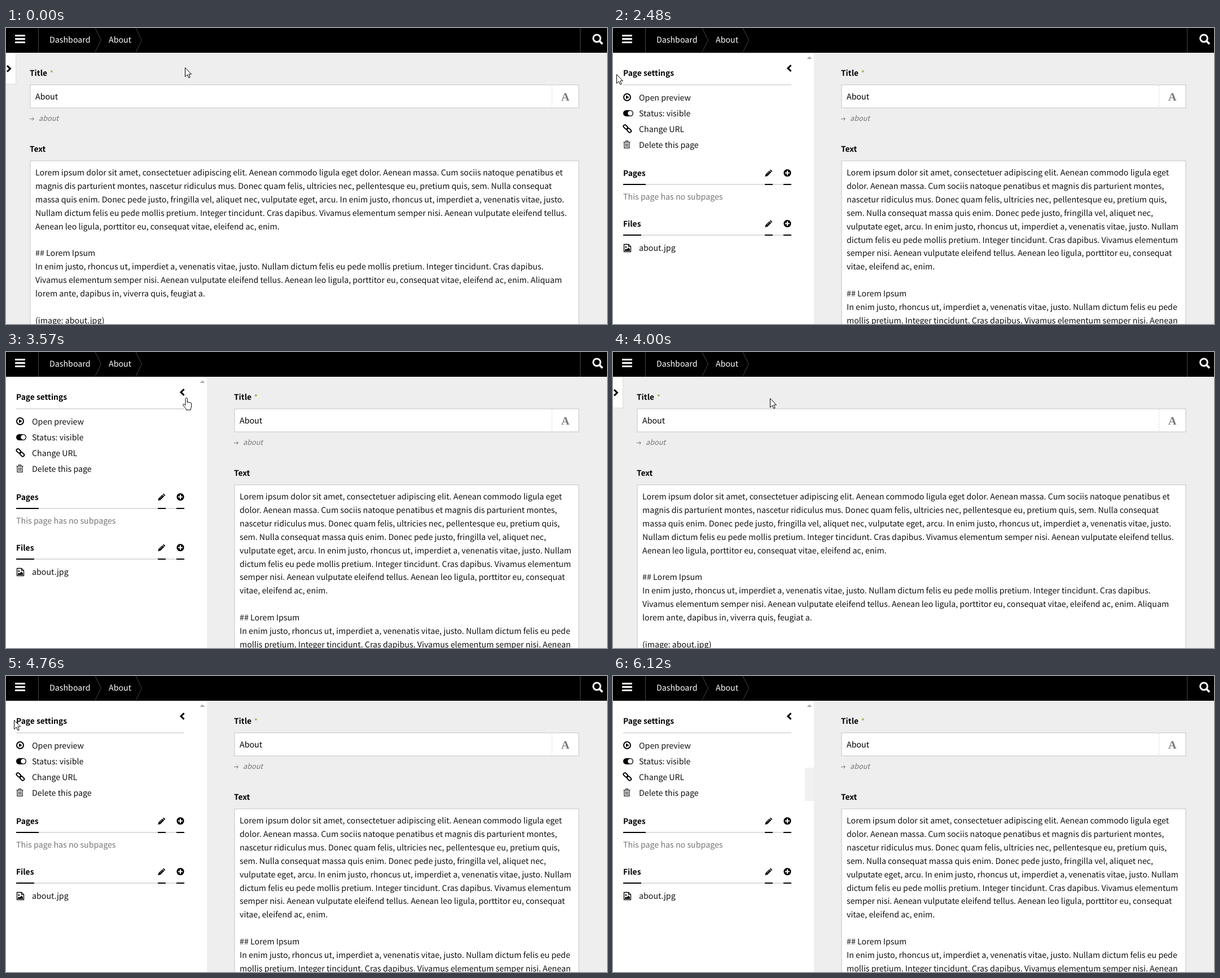
An HTML page with a canvas that plays this animation: 1065x526 px, repeating every 6400 ms.

```html
<!DOCTYPE html>
<html lang="en">
<head>
<meta charset="utf-8">
<title>Page editor</title>
<style>
  html, body { margin: 0; width: 100%; height: 100%; overflow: hidden; background: #eee; }
  canvas { display: block; }
</style>
</head>
<body>
<canvas id="stage" width="1065" height="526"></canvas>
<script>
const ctx = document.getElementById('stage').getContext('2d', { alpha: false });
const LOOP = 6400;
const SANS = '"Noto Sans CJK SC", "Noto Sans CJK JP", "Noto Sans CJK KR", "Noto Sans CJK TC", "Noto Sans", sans-serif';
const BODY = `14.24px ${SANS}`;
const BOLD = `600 13.8px ${SANS}`;
const ITALIC = `italic 12.7px ${SANS}`;
const RULE = '#ddd';

const WIDE = [
  'Lorem ipsum dolor sit amet, consectetuer adipiscing elit. Aenean commodo ligula eget dolor. Aenean massa. Cum sociis natoque penatibus et',
  'magnis dis parturient montes, nascetur ridiculus mus. Donec quam felis, ultricies nec, pellentesque eu, pretium quis, sem. Nulla consequat',
  'massa quis enim. Donec pede justo, fringilla vel, aliquet nec, vulputate eget, arcu. In enim justo, rhoncus ut, imperdiet a, venenatis vitae, justo.',
  'Nullam dictum felis eu pede mollis pretium. Integer tincidunt. Cras dapibus. Vivamus elementum semper nisi. Aenean vulputate eleifend tellus.',
  'Aenean leo ligula, porttitor eu, consequat vitae, eleifend ac, enim.',
  '',
  '## Lorem Ipsum',
  'In enim justo, rhoncus ut, imperdiet a, venenatis vitae, justo. Nullam dictum felis eu pede mollis pretium. Integer tincidunt. Cras dapibus.',
  'Vivamus elementum semper nisi. Aenean vulputate eleifend tellus. Aenean leo ligula, porttitor eu, consequat vitae, eleifend ac, enim. Aliquam',
  'lorem ante, dapibus in, viverra quis, feugiat a.',
  '',
  '(image: about.jpg)'
];
const NARROW = [
  'Lorem ipsum dolor sit amet, consectetuer adipiscing elit. Aenean commodo ligula eget',
  'dolor. Aenean massa. Cum sociis natoque penatibus et magnis dis parturient montes,',
  'nascetur ridiculus mus. Donec quam felis, ultricies nec, pellentesque eu, pretium quis,',
  'sem. Nulla consequat massa quis enim. Donec pede justo, fringilla vel, aliquet nec,',
  'vulputate eget, arcu. In enim justo, rhoncus ut, imperdiet a, venenatis vitae, justo. Nullam',
  'dictum felis eu pede mollis pretium. Integer tincidunt. Cras dapibus. Vivamus elementum',
  'semper nisi. Aenean vulputate eleifend tellus. Aenean leo ligula, porttitor eu, consequat',
  'vitae, eleifend ac, enim.',
  '',
  '## Lorem Ipsum',
  'In enim justo, rhoncus ut, imperdiet a, venenatis vitae, justo. Nullam dictum felis eu pede',
  'mollis pretium. Integer tincidunt. Cras dapibus. Vivamus elementum semper nisi. Aenean'
];

// Pointer shapes, drawn from their top left corner.
const POINTERS = {
  arrow: new Path2D('M.5 .5V16.5L4.3 13L6.8 18.5L9.2 17.5L6.8 12H11.5Z'),
  hand: new Path2D('M5 14V2.3a1.7 1.7 0 0 1 3.4 0V9c0-1.6 2.8-1.6 2.8.3c0-1.4 2.4-1.2 2.4.6c0-1.3 2-1 2 .6V15c0 3-1.5 4-1.5 7H6.5c0-2.5-5-6.5-5.7-9c-.3-1.5 1.6-2 2.6-.8z'),
  beam: new Path2D('M.5 .5H2.8M4.2 .5H6.5M3.5 1V15M.5 15.5H2.8M4.2 15.5H6.5')
};

// Pointer stops: start time, shape, left, top.
const STOPS = [
  [0, 'arrow', 317, 70], [840, 'arrow', 309, 90], [960, 'arrow', 274, 168],
  [1080, 'beam', 228, 252], [1200, 'beam', 200, 282], [1350, 'beam', 185, 293],
  [1500, 'beam', 172, 301], [1620, 'beam', 179, 292], [1770, 'beam', 157, 240],
  [1900, 'beam', 108, 128], [2050, 'arrow', 35, 98], [2200, 'arrow', 19, 88],
  [2330, 'hand', 2, 82], [2480, 'arrow', 6, 82], [2600, 'arrow', 7, 81],
  [3030, 'arrow', 126, 115], [3160, 'arrow', 247, 105], [3300, 'arrow', 274, 99],
  [3450, 'arrow', 301, 90], [3570, 'hand', 313, 81], [4000, 'arrow', 278, 82],
  [4120, 'arrow', 176, 90], [4240, 'arrow', 80, 88], [4390, 'arrow', 28, 83],
  [4520, 'hand', 4, 79], [4640, 'arrow', 10, 79], [4760, 'arrow', 14, 78],
  [4910, 'arrow', 62, 94], [5030, 'arrow', 165, 130], [5150, 'arrow', 282, 172],
  [5270, 'arrow', 378, 203], [5420, 'beam', 530, 272], [5540, 'beam', 690, 353],
  [5660, 'beam', 805, 411], [5810, 'beam', 905, 496], [5970, 'beam', 977, 508],
  [6120, 'none', 0, 0]
];

const isOpen = t => (t >= 2480 && t < 4000) || t >= 4640;

function rect(x, y, w, h, color) {
  ctx.fillStyle = color;
  ctx.fillRect(x, y, w, h);
}

function text(str, x, y, font = BODY, color = '#000') {
  ctx.font = font;
  ctx.fillStyle = color;
  ctx.fillText(str, x, y);
}

function line(points, color, width) {
  ctx.beginPath();
  for (const [x, y] of points) ctx.lineTo(x, y);
  ctx.strokeStyle = color;
  ctx.lineWidth = width;
  ctx.stroke();
}

function disc(x, y, r, color) {
  ctx.beginPath();
  ctx.arc(x, y, r, 0, Math.PI * 2);
  ctx.fillStyle = color;
  ctx.fill();
}

function ring(x, y, r, color, width) {
  ctx.beginPath();
  ctx.arc(x, y, r, 0, Math.PI * 2);
  ctx.strokeStyle = color;
  ctx.lineWidth = width;
  ctx.stroke();
}

function shape(points, color) {
  ctx.beginPath();
  for (const [x, y] of points) ctx.lineTo(x, y);
  ctx.fillStyle = color;
  ctx.fill();
}

function pill(x, y, w, h, r, color) {
  ctx.beginPath();
  ctx.roundRect(x, y, w, h, r);
  ctx.fillStyle = color;
  ctx.fill();
}

function box(x, y, w, h) {
  rect(x, y, w, h, RULE);
  rect(x + 2, y + 2, w - 4, h - 4, '#fff');
}

function drawHeader() {
  rect(0, 0, 1065, 44, '#000');
  for (const y of [12, 18, 24]) pill(16, y, 18, 3, 1, '#fff');
  for (const x of [57, 1017]) rect(x, 0, 1, 44, '#444');
  for (const x of [158, 230]) line([[x, 0], [x + 10.5, 21.5], [x, 43]], '#444', 1);
  text('Dashboard', 77, 26, BODY, '#fff');
  text('About', 182, 26, BODY, '#fff');
  ring(1047, 18.3, 6.4, '#fff', 3);
  line([[1051.6, 23], [1057, 28.4]], '#fff', 3.6);
}

function drawForm(left, lines) {
  const width = 1016 - left;
  text('Title', left, 85, BOLD);
  text('*', left + 35.5, 86, BODY, '#8dae28');
  box(left, 100, width, 43);
  text('About', left + 10, 127);
  ctx.setLineDash([3, 2]);
  line([[967.5, 102], [967.5, 141]], RULE, 1);
  ctx.setLineDash([]);
  text('A', 984, 129, 'bold 20px "Liberation Serif", serif', '#777');

  line([[left, 161.5], [left + 7, 161.5]], '#777', 1);
  line([[left + 4.5, 158.5], [left + 7.5, 161.5], [left + 4.5, 164.5]], '#777', 1);
  text('about', left + 16, 165, ITALIC, '#777');

  text('Text', left, 220, BOLD);
  box(left, 235, width, 320);
  lines.forEach((str, i) => text(str, left + 10, Math.round(262 + 23.9 * i), BODY, '#111'));
}

function drawTab() {
  rect(0, 44, 18, 56, RULE);
  rect(0, 44, 17, 55, '#fff');
  line([[2, 67], [7.5, 72.3], [2, 77.6]], '#000', 3);
}

function drawLink(x, y) {
  ctx.save();
  ctx.translate(x, y);
  ctx.rotate(Math.PI / 4);
  ctx.beginPath();
  ctx.roundRect(-4, -2.6, 8, 5.2, 2.2);
  ctx.strokeStyle = '#000';
  ctx.lineWidth = 1.9;
  ctx.stroke();
  ctx.restore();
}

function drawMenuIcons() {
  ring(25, 123, 6, '#000', 2);
  shape([[23, 119.8], [28.6, 123], [23, 126.2]], '#000');

  pill(18, 146, 18, 11, 5.5, '#000');
  disc(30.5, 151.5, 4.2, '#fff');

  drawLink(22.2, 175.8);
  drawLink(28.6, 182);

  line([[18.5, 203], [30.5, 203]], '#222', 1.2);
  line([[22, 202.5], [22.7, 200.6], [26.3, 200.6], [27, 202.5]], '#222', 1.2);
  line([[20, 203], [20, 213.4], [29, 213.4], [29, 203]], '#222', 1.3);
  for (const x of [22.5, 24.5, 26.5]) line([[x, 205], [x, 211.5]], '#222', 1);
}

function drawFileIcon() {
  line([[19.5, 384.5], [27.5, 384.5], [31.5, 388.5], [31.5, 397.5], [19.5, 397.5], [19.5, 383.9]], '#000', 1.3);
  line([[27.5, 384.5], [27.5, 388.5], [31.5, 388.5]], '#000', 1.2);
  disc(22.8, 389.3, 1.4, '#000');
  shape([[21, 396], [21, 394], [23, 392.2], [24.4, 393.4], [27.3, 390.3], [30, 393], [30, 396]], '#000');
}

function drawSection(title, baseline, underline) {
  const rule = baseline + 14;
  text(title, 18, baseline, BOLD);
  rect(18, rule, 298, 2, RULE);
  rect(18, rule, underline, 2, '#000');
  rect(269, rule, 14, 2, '#000');
  rect(302, rule, 14, 2, '#000');

  ctx.save();
  ctx.translate(269.5, baseline + 1);
  shape([[0, 0], [0.8, -4], [7.6, -10.6], [10.8, -7.4], [4, -0.8]], '#000');
  shape([[8.4, -11.3], [9.8, -12.4], [12.8, -9.4], [11.5, -8.1]], '#000');
  line([[3, -3.8], [8.2, -8.8]], '#fff', 0.7);
  ctx.restore();

  const cy = baseline - 5.5;
  disc(309, cy, 6.6, '#000');
  rect(305, cy - 1, 8, 2, '#fff');
  rect(308, cy - 4, 2, 8, '#fff');
}

function drawSidebar(showThumb) {
  rect(0, 44, 356, 482, '#fff');
  shape([[343.5, 55], [348, 50.5], [352.5, 55]], '#aaa');
  if (showThumb) rect(340, 163, 16, 59, '#f1f1f1');

  text('Page settings', 18, 85, BOLD);
  line([[315.5, 66.2], [310, 71.5], [315.5, 76.8]], '#000', 3);
  rect(18, 100, 298, 2, RULE);
  ['Open preview', 'Status: visible', 'Change URL', 'Delete this page']
    .forEach((str, i) => text(str, 46, 129 + 28 * i, BODY, '#111'));
  drawMenuIcons();

  drawSection('Pages', 263, 40);
  text('This page has no subpages', 18, 305, BODY, '#777');
  drawSection('Files', 353, 32);
  drawFileIcon();
  text('about.jpg', 46, 396, BODY, '#111');
}

function drawPointer(t) {
  const [, kind, x, y] = STOPS.findLast(stop => stop[0] <= t);
  const path = POINTERS[kind];
  if (!path) return;
  ctx.save();
  ctx.translate(x, y);
  if (kind !== 'beam') {
    ctx.fillStyle = '#fff';
    ctx.fill(path);
  }
  ctx.strokeStyle = '#000';
  ctx.lineWidth = 1;
  ctx.stroke(path);
  ctx.restore();
}

function draw(t) {
  const open = isOpen(t);
  ctx.textRendering = 'geometricPrecision';
  rect(0, 0, 1065, 526, '#eee');
  drawForm(open ? 404 : 42, open ? NARROW : WIDE);
  if (open) drawSidebar(t >= 5270);
  else drawTab();
  drawHeader();
  drawPointer(t);
}

const start = performance.now();
function tick() {
  draw((performance.now() - start) % LOOP);
  requestAnimationFrame(tick);
}
tick();
</script>
</body>
</html>
```
